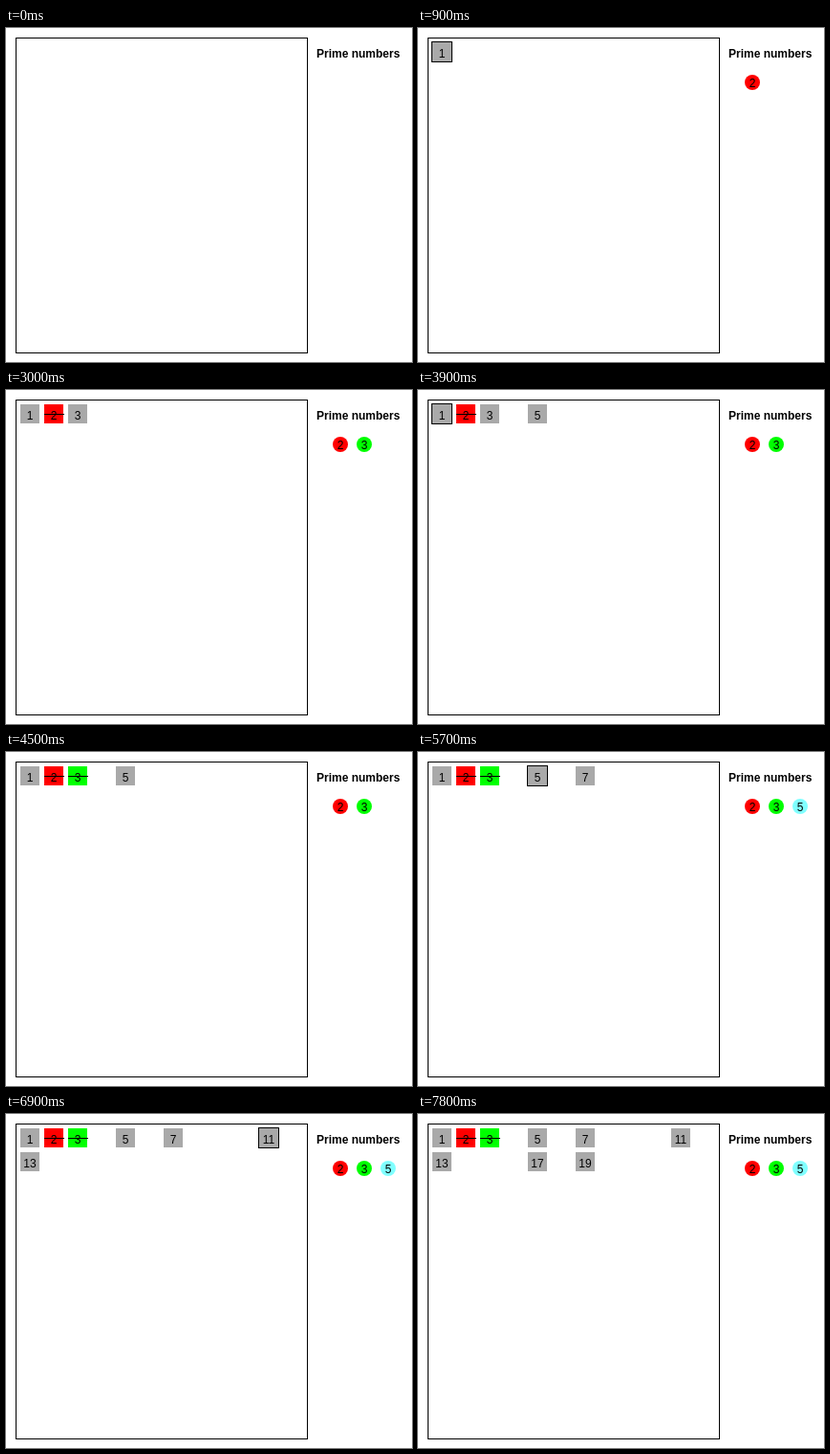
Write an HTML page with a canvas that moves like this. It is 425 by 350 pixels and loops after 8 s.

```html
<!DOCTYPE html>
<html lang="en">
<head>
<meta charset="utf-8">
<title>Wheel sieve</title>
<style>
html, body { margin: 0; width: 100%; height: 100%; overflow: hidden; background: #fff; }
canvas { display: block; }
</style>
</head>
<body>
<canvas id="stage" width="425" height="350"></canvas>
<script>
const ctx = document.getElementById('stage').getContext('2d');
const STEP = 300, LOOP = 8000, COLUMNS = 12;
const COLORS = { 2: '#f00', 3: '#0f0', 5: '#80ffff' };

// Each step is [action, number]; an outline lasts only for its own step.
function buildSteps() {
  const steps = [['insert', 1]];
  let wheel = [1], length = 1;
  for (const p of [2, 3, 5]) {
    steps.push(['prime', p]);
    const limit = p * length;
    for (let i = 0; wheel[i] + length <= limit; i++) {
      const n = wheel[i] + length;
      wheel.push(n);
      steps.push(['outline', wheel[i]], ['insert', n]);
    }
    const multiples = wheel.filter(w => p * w <= limit);
    for (const w of multiples) steps.push(['outline', w], ['mark', p * w, p]);
    for (const w of multiples) steps.push(['strike', p * w]);
    wheel = wheel.filter(n => n % p);
    length = limit;
  }
  return steps;
}

const steps = buildSteps();

function label(text, x, y) {
  ctx.fillStyle = '#000';
  ctx.font = '12px "Liberation Sans", Arial, sans-serif';
  ctx.textAlign = 'center';
  ctx.fillText(text, x, y);
}

function cell(n, color) {
  const x = 15 + (n - 1) % COLUMNS * 25;
  const y = 15 + Math.floor((n - 1) / COLUMNS) * 25;
  return {
    fill() {
      ctx.fillStyle = color;
      ctx.fillRect(x, y, 20, 20);
      label(n, x + 10, y + 16);
    },
    outline() { ctx.strokeRect(x - 0.5, y - 0.5, 21, 21); },
    strike() {
      ctx.fillStyle = '#000';
      ctx.fillRect(x, y + 10, 21, 1);
    }
  };
}

function draw(count) {
  ctx.fillStyle = '#fff';
  ctx.fillRect(0, 0, 425, 350);
  ctx.strokeStyle = '#000';
  ctx.lineWidth = 1;
  ctx.strokeRect(10.5, 10.5, 305, 330);

  ctx.fillStyle = '#000';
  ctx.font = 'bold 12px "Liberation Sans", Arial, sans-serif';
  ctx.textAlign = 'left';
  ctx.fillText('Prime numbers', 325, 31);

  let primes = 0;
  steps.slice(0, count).forEach(([action, n, p], i) => {
    if (action === 'insert') cell(n, '#a9a9a9').fill();
    if (action === 'mark') cell(n, COLORS[p]).fill();
    if (action === 'strike') cell(n).strike();
    if (action === 'outline' && i === count - 1) cell(n).outline();
    if (action === 'prime') {
      const x = 350 + 25 * primes++;
      ctx.fillStyle = COLORS[n];
      ctx.beginPath();
      ctx.arc(x, 57, 8, 0, Math.PI * 2);
      ctx.fill();
      label(n, x, 62);
    }
  });
}

const start = performance.now();
function tick() {
  draw(Math.floor((performance.now() - start) % LOOP / STEP));
  requestAnimationFrame(tick);
}
tick();
</script>
</body>
</html>
```
